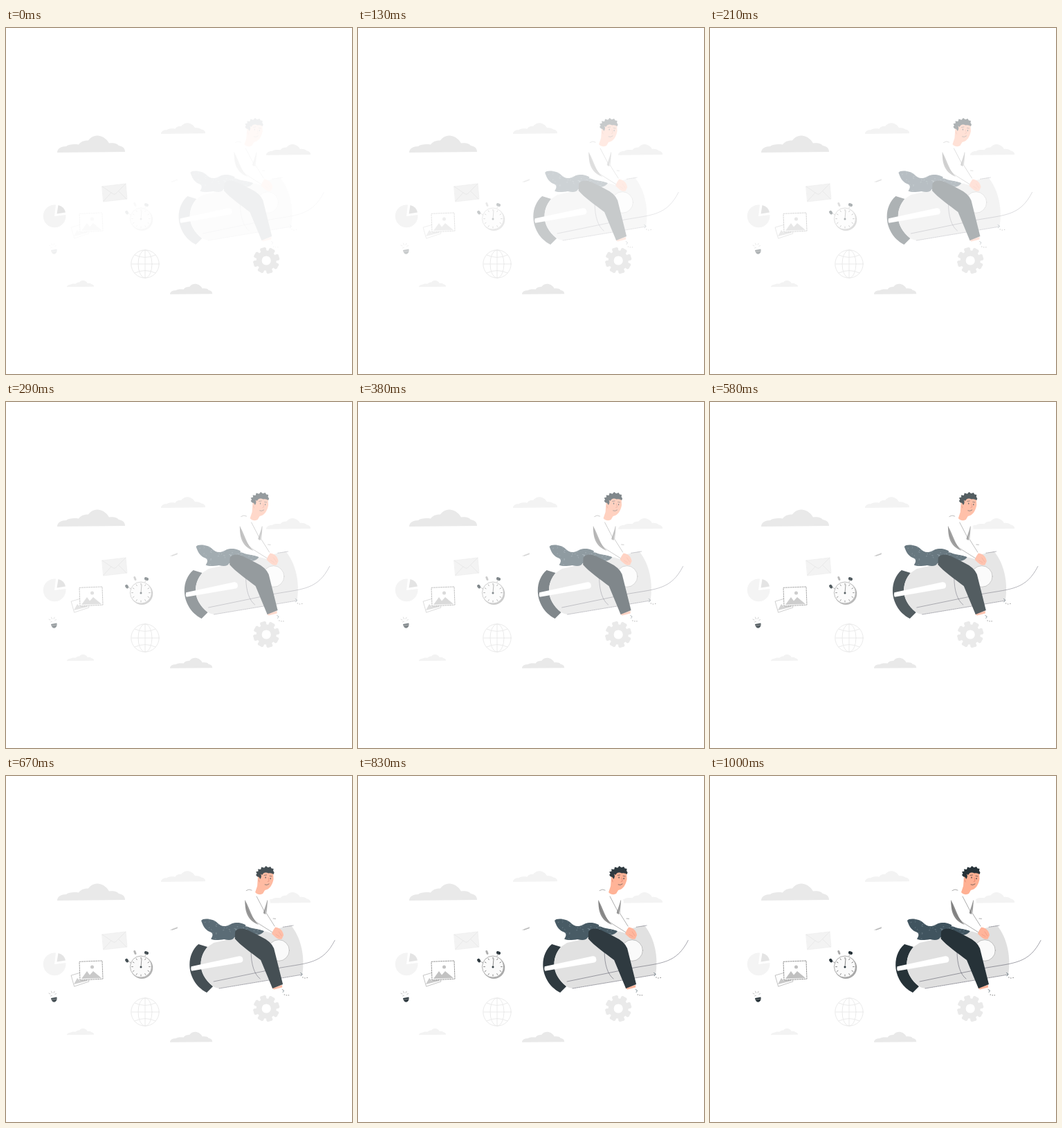
An HTML page for the animation above (1040 ms loop, 500 by 500 pixels).

```html
<!DOCTYPE html>
<html lang="en">
<head>
<meta charset="utf-8">
<title>Rocket rider</title>
<style>
  html, body { margin: 0; width: 100%; height: 100%; overflow: hidden; background: #fff; }
  svg { display: block; width: 100vw; height: 100vh; }
</style>
</head>
<body>
<svg viewBox="0 0 500 500" fill="none" stroke-linecap="round" stroke-linejoin="round">
  <defs>
    <path id="cloud" d="M0 25C0 19 6 16 13 16C17 13 24 12.5 31 13.5C34 9 39 7.5 45 7.5C48 3 53 .5 59 .5C66 1 72 6 75 11.5C81 10.5 87 12 89 15C95 16 98 19 98 24Z"/>
    <clipPath id="capeClip"><use href="#cape"/></clipPath>
  </defs>

  <!-- Fixed scenery -->
  <g id="clouds"></g>
  <g stroke="#e6e6e6" stroke-width=".8">
    <path d="M139 229L173 225L175 247L141 251Z" fill="#f3f3f3" stroke="#efefef"/>
    <path d="M139 229L155 240Q157 241 159 239L173 225M141 250L152 238M174 247L163 236"/>
  </g>
  <path d="M70 272L72 255.6A16.4 16.4 0 1 0 86.4 270Z" fill="#f4f4f4"/>
  <path d="M73.5 268.5L75.5 256A14 14 0 0 1 86 266.5Z" fill="#e4e4e4"/>
  <g stroke="#e8e8e8" stroke-width=".9">
    <circle cx="201" cy="341" r="20.2"/>
    <ellipse cx="201" cy="341" rx="10" ry="20.2"/>
    <path d="M201 321V361M181 341H221M186 328Q201 335 216 328M186 354Q201 347 216 354"/>
  </g>
  <path id="gear" fill="#eaeaea" fill-rule="evenodd"/>

  <!-- Small items that fade in -->
  <g id="items">
    <path d="M236.5 222.5L248 217.7L247.5 220L240 222.8Z" fill="#d0d0d0"/>
    <path d="M240 222.2L247.5 219.8" stroke="#888" stroke-width=".5"/>

    <path d="M65 321L73.4 319.4C74.2 323 72.5 326.4 69.5 326.8C66.8 326.4 65.3 324 65 321Z" fill="#263238"/>
    <path d="M66 323.3L73 322" stroke="#aaa" stroke-width=".6"/>
    <path d="M62 314L64 315M65.5 311L66.5 313.5M70 311.2L69 313.5M72.5 314.5L70.8 315.5M64.5 318L66.5 317" stroke="#999" stroke-width=".6"/>

    <path d="M94.5 288L115 282L120 297L99 304Z" fill="#fff" stroke="#999" stroke-width=".6"/>
    <path d="M98 301L103 292L107 296L111 287L118 296Z" fill="#c8c8c8"/>
    <path d="M106 268.3L139 267L140 293.2L107 295Z" fill="#fff" stroke="#777" stroke-dasharray="2 1.4" stroke-width=".8"/>
    <path d="M109 293L117 282L121 287.5L126 282L138 292Z" fill="#c0c0c0"/>
    <circle cx="124.5" cy="276" r="2.5" fill="#c0c0c0"/>

    <circle cx="196.3" cy="277" r="16" fill="#a8a8a8"/>
    <circle cx="195" cy="275.6" r="15.6" fill="#fafafa" stroke="#777" stroke-width=".6"/>
    <path id="ticks" stroke="#555" stroke-width=".7"/>
    <path d="M195 276L196 264" stroke="#555" stroke-width=".7"/>
    <circle cx="195" cy="276" r="1.5" fill="#263238"/>
    <path d="M185.8 253.5L187 256.5" stroke="#aaa" stroke-width="3"/>
    <path d="M174.2 266L175.2 267.4M202 255.2L204 256" stroke="#263238" stroke-width="4.2"/>
    <path d="M177 268L181 270M202.5 257L201 260" stroke="#777" stroke-width=".6"/>
  </g>

  <!-- Rider and rocket -->
  <g id="rider">
    <path d="M281 243L294 247C281 262 279 286 302 304L293 313C264 298 261 260 281 243Z" fill="#263238"/>
    <path d="M294 247L303 241L415 216C430 235 435 262 431 287L311 307Q305 306 302 304C279 286 281 262 294 247Z" fill="#e0e0e0"/>
    <path d="M270.5 275.3L340 260.3A4.9 4.9 0 0 1 342.5 269.6L271 281.8Q269.5 279 270.5 275.3Z" fill="#fff"/>
    <circle cx="397" cy="252" r="15.3" fill="#fafafa" stroke="#888" stroke-width=".5"/>
    <g stroke="#445" stroke-width=".5">
      <path d="M357 253C357 273 362 287 370 293"/>
      <path d="M303 297L400 277C440 270 461 271 478 237.5"/>
      <path d="M311 307L431 287M403 218.3L418 216" stroke-dasharray="2 1"/>
    </g>

    <path id="cape" d="M285 209C287 205 301 206 307 211C311 215 315 217.5 320 217C326 216 329 212 335 212C343 211.5 348 214 353 218C361 222 369 220 376 224Q373 229 365 230L340 230L333 233C331 237 326 238 318 236C311 237 304 238 299 235.5C302 231 303 227 297 225C290 222 287 215 285 209Z" fill="#40545f"/>
    <g id="specks" clip-path="url(#capeClip)" stroke="#8b9da6" stroke-width=".5"></g>

    <path d="M350 166C355 162.5 362 164 364 167L376 170C383 172 386 179 384.5 188L379 203L393 218L387 227L366 221L349 217C352 205 347 192 347.5 178Z" fill="#fff"/>
    <path d="M348.5 180C348 193 350 208 368 215C358 206 356 193 348.5 180Z" fill="#888"/>
    <path d="M380.5 180L374.5 198L377.5 200Q380 190 380.5 180Z" fill="#999"/>
    <path d="M350 165.5Q354 162.5 358 165M365 174L378 199M348.5 180C349 193 357 207 369 214L388 226M380.5 180L379 198L391 217M389 206L392.5 206.3" stroke="#666" stroke-width=".55"/>

    <path d="M387 306L402 302L402 305.5L390 308.5Z" fill="#ffb49a"/>
    <path d="M334 225C338 219 346 220 353 223L371 232Q386 239 390 249L403 301L388 307L371 266C358 256 342 245 333.5 235Z" fill="#263238"/>
    <path d="M392 218.5C399 219 403 224 404 230L401.5 235.5C396 237 392 233 387 228L389 223Z" fill="#ffb49a"/>
    <path d="M393 229L398 232M397 225L401 231" stroke="#e88c76" stroke-width=".5"/>

    <path d="M367 144L366 159L363 168C366 171.5 371 172 374 170L377 165C384 164 388 157 389.5 149L389 140L374 139Z" fill="#ffb093"/>
    <path d="M366 145.5L364 143L365.5 141L364 138.5L367.5 137.5L367 134.5L371 135L372 131.5L376 132.8L378.5 130L381.5 132.2L385 131L386.5 133.5L389.5 134L389 137L390.5 139.5L389.5 142Q386 139.5 382 140.5Q378 138.5 375 140.5L373 143L371 141.5Q373 146 370 149Q369 145 366 145.5Z" fill="#263238"/>
    <path d="M378 146V147.3M385 147.5V148.8" stroke="#263238" stroke-width="1.1"/>
    <path d="M376 143.5L379.5 143M384 144.5L387 145M377 157Q380 158.5 383 156" stroke="#263238" stroke-width=".6"/>
    <path d="M382 147L383 152L381 152.5M368 150L369 153" stroke="#d97560" stroke-width=".6"/>

    <path d="M402 308.5L404.5 310L403 312.5M428.5 284.5L431 286L429 289" stroke="#607079" stroke-width=".8"/>
    <path d="M405 316H405.6M408 316.8H408.6M411 316.8H411.6M431.5 291H432.1M434.5 292H435.1M437.8 291.5H438.4" stroke="#555" stroke-width=".8"/>
  </g>
</svg>
<script>
const LOOP = 1040, STEP = 1000 / 24, STEPS = 25;
const $ = id => document.getElementById(id);
const polar = (x, y, r, a) => (x + r * Math.cos(a)).toFixed(2) + " " + (y + r * Math.sin(a)).toFixed(2);

// x, y, horizontal scale, vertical scale, fill
$("clouds").innerHTML = [
  [74, 155, 1, 1, "#e9e9e9"],
  [224, 137, .655, .64, "#f3f3f3"],
  [376, 167.7, .655, .64, "#f3f3f3"],
  [237, 369.5, .625, .61, "#e9e9e9"],
  [88, 364.5, .4, .39, "#f3f3f3"]
].map(([x, y, sx, sy, c]) =>
  `<use href="#cloud" fill="${c}" transform="translate(${x} ${y}) scale(${sx} ${sy})"/>`).join("");

function gearPath(x, y) {
  const corners = [];
  for (let i = 0; i < 8; i++) {
    const a = (29 + i * 45) * Math.PI / 180;
    for (const [r, d] of [[14.5, -.3], [18, -.26], [19.3, -.17], [19.3, .17], [18, .26], [14.5, .3]])
      corners.push(polar(x, y, r, a + d));
  }
  return `M${corners.join("L")}ZM${x - 6.6} ${y}a6.6 6.6 0 1 0 13.2 0a6.6 6.6 0 1 0 -13.2 0Z`;
}
$("gear").setAttribute("d", gearPath(376.2, 336));

let ticks = "";
for (let i = 0; i < 12; i++) {
  const a = i * Math.PI / 6;
  ticks += `M${polar(195, 275.6, 11.5, a)}L${polar(195, 275.6, 13.5, a)}`;
}
$("ticks").setAttribute("d", ticks);

// Scattered flecks on the cape cloth
let seed = 7;
const random = () => (seed = seed * 16807 % 2147483647) / 2147483647;
let flecks = "";
for (let i = 0; i < 90; i++)
  flecks += `M${290 + random() * 80} ${208 + random() * 28}l${.5 + random()} ${random() - .5}`;
$("specks").innerHTML = `<path d="${flecks}"/>`;

function draw(now) {
  const t = now % LOOP;
  const step = Math.min(STEPS - 1, Math.floor((t + 4.9) / STEP));
  const left = Math.pow(1 - (step + 1) / STEPS, 1.7);
  $("items").setAttribute("opacity", 1 - left);
  $("rider").setAttribute("opacity", 1 - left);
  $("rider").setAttribute("transform", `translate(${-20 * left} 0)`);
}

const start = performance.now();
function tick() {
  draw(performance.now() - start);
  requestAnimationFrame(tick);
}
tick();
</script>
</body>
</html>
```
